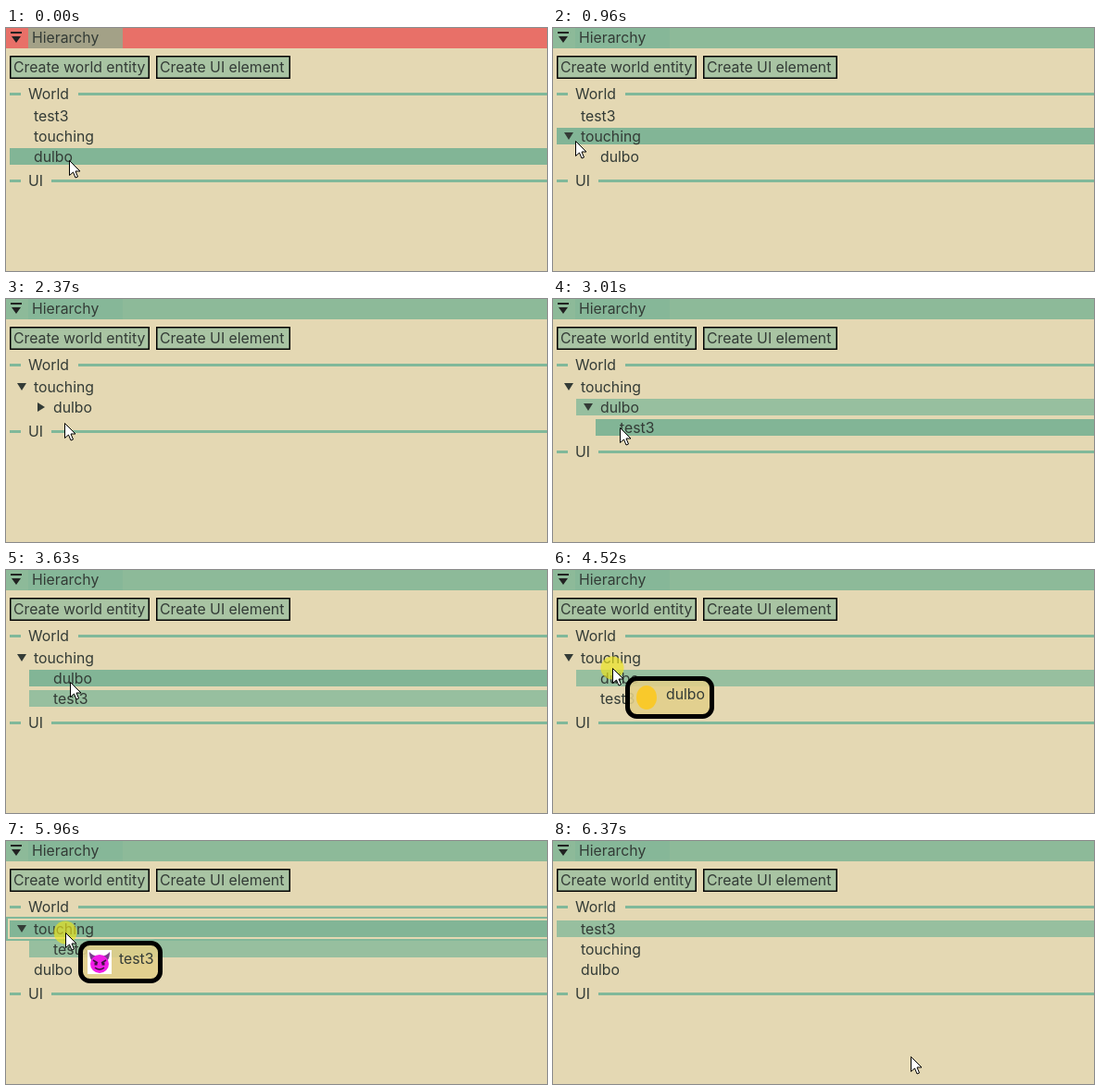
An HTML page that plays this animation: 584 by 263 pixels, repeating every 6440 ms.

```html
<!DOCTYPE html>
<html lang="en">
<head>
<meta charset="utf-8">
<title>Hierarchy panel</title>
<style>
html, body { margin: 0; width: 100%; height: 100%; overflow: hidden; background: #e4d8b3; }
svg { display: block; width: 584px; height: 263px; font: 15.8px Inter, "Open Sans", sans-serif; fill: #333b36; }
</style>
</head>
<body>
<svg id="stage" viewBox="0 0 584 263"></svg>
<script>
const LOOP = 6440, PITCH = 22, TOP = 86, INDENT = 21, DRAG_DISTANCE = 6;
const BG = '#e4d8b3', LINE = '#80b89a', HOVER = '#82b596', ACTIVE = '#8dba99', SELECTED = '#97bf9f';
const names = ['test3', 'touching', 'dulbo'];

// Mouse gestures: a drag drops an item onto another one, a click opens or closes it
const drag = (item, onto, down, arrive, up, from, to) => ({ item, onto, down, arrive, up, from, to });
const click = (item, down, up, at) => ({ item, down, arrive: up, up, from: at, to: at });
const gestures = [
  drag('dulbo', 'touching', 70, 400, 480, [68, 143], [62, 118]),
  click('touching', 770, 830, [20, 125]),
  drag('test3', 'dulbo', 1290, 1815, 2170, [65, 96], [75, 141]),
  click('dulbo', 2640, 2710, [38, 119]),
  drag('test3', 'dulbo', 3080, 3290, 3490, [73, 140], [69, 121]),
  drag('dulbo', 'touching', 4250, 4680, 4790, [65, 114], [63, 96]),
  drag('test3', 'touching', 5270, 6030, 6160, [62, 113], [64, 97])
];
const exit = { down: 6370, from: [386, 233] };

const icons = {
  test3: `<path fill="#fff" d="M0 0h26v26H0z"/>
    <path fill="#7b3a8c" d="M2 2Q2 9 5 12L11 7Q5 6 2 2M24 2Q24 9 21 12L15 7Q21 6 24 2"/>
    <circle cx="13" cy="15" r="10" fill="#f01ce6"/>
    <path fill="none" stroke="#401040" stroke-width="1.6" d="M6 11l5 3M20 11l-5 3M8 19q5 4 10 0"/>
    <path fill="#401040" d="M7.5 13.5h3v3h-3zM15.5 13.5h3v3h-3z"/>`,
  dulbo: '<ellipse cx="13" cy="13" rx="11" ry="13" fill="#f9c92b"/>'
};

const easeIn = k => k ** 1.7;
const easeInOut = k => k < .5 ? 4 * k ** 3 : 1 - 4 * (1 - k) ** 3;
const progress = (t, start, end) => Math.min(1, Math.max(0, (t - start) / (end - start)));
const mix = (a, b, k) => a.map((v, i) => Math.round(v + (b[i] - v) * k));

const rect = (x, y, w, h, fill, more = '') => `<rect x="${x}" y="${y}" width="${w}" height="${h}" fill="${fill}" ${more}/>`;
const text = (x, y, s) => `<text x="${x}" y="${y}">${s}</text>`;
const at = (x, y, content) => `<g transform="translate(${x} ${y})">${content}</g>`;
const button = (x, w, s) => rect(x + .75, 30.75, w - 1.5, 23.5, '#a9c4a3', 'stroke="#000" stroke-width="1.5"') + text(x + 4, 48, s);
const separator = (y, x, s) => rect(4, y - 1.5, 12, 3, LINE) + rect(x, y - 1.5, 584 - x, 3, LINE) + text(24, y + 5, s);

function pointer(t) {
  const i = gestures.findLastIndex(g => g.down <= t);
  if (i < 0) return gestures[0].from;
  const g = gestures[i], next = gestures[i + 1] || exit;
  return t < g.up
    ? mix(g.from, g.to, easeIn(progress(t, g.down, g.arrive)))
    : mix(g.to, next.from, easeInOut(progress(t, g.up, next.down)));
}

// Replays finished gestures; dropping an item onto its own parent lifts it one level
function treeAt(t) {
  const items = names.map((name, id) => ({ name, id, order: id, parent: null, open: false }));
  const find = name => items.find(item => item.name === name);
  gestures.filter(g => g.up <= t).forEach((g, n) => {
    const item = find(g.item), onto = find(g.onto);
    if (!onto) {
      item.open = !item.open;
      return;
    }
    item.parent = item.parent === onto ? onto.parent : onto;
    item.order = item.parent ? names.length + n : item.id;
  });
  return items.sort((a, b) => a.order - b.order);
}

function listRows(items, parent = null, depth = 0) {
  return items.filter(item => item.parent === parent).flatMap(item => {
    const children = listRows(items, item, depth + 1);
    const row = { name: item.name, depth, open: item.open, branch: children.length > 0 };
    return item.open ? [row, ...children] : [row];
  });
}

function header(focused) {
  return rect(0, 0, 584, 22, focused ? ACTIVE : '#e87068') +
    rect(24, 0, 102, 22, focused ? '#86b798' : '#a3a187') +
    '<path fill="#222" d="M5 4h12v2H5zM6 9h10l-5 7z"/>' + text(28, 16, 'Hierarchy');
}

function drawRow({ name, depth, open, branch }, i, mouse) {
  const dx = depth * INDENT, y = TOP + PITCH * i;
  const hovered = mouse.y >= y - 1 && mouse.y < y + 20;
  const held = mouse.held === name;
  const fill = hovered ? (held ? ACTIVE : HOVER) : mouse.selected === name && SELECTED;
  let out = fill ? rect(4 + dx, y, 580 - dx, 18, fill) : '';
  if (hovered && mouse.dragging && !held)
    out += rect(dx + 1, y - 3, 590, 24, 'none', `stroke="${LINE}" stroke-width="2"`);
  if (branch) out += at(17 + dx, y + 9, `<path d="${open ? 'M-5-4H5L0 4z' : 'M-4-5V5L4 0z'}"/>`);
  return out + text(30 + dx, y + 15, name);
}

// The tooltip trails slightly behind the pointer
function tooltip(t, name) {
  const [x, y] = pointer(t - 20);
  const width = name === 'test3' ? 86 : 91;
  return at(x + 14, y + 8,
    rect(2.5, 2.5, width, 41, '#e2d08a', 'fill-opacity=".88" rx="10" stroke="#000" stroke-width="5"') +
    at(10, 10, icons[name]) + text(44, 25, name));
}

function render(t) {
  const [x, y] = pointer(t);
  const g = gestures.findLast(g => g.down <= t);
  const pressed = g && t < g.up;
  const dragging = pressed && Math.hypot(x - g.from[0], y - g.from[1]) > DRAG_DISTANCE;
  const mouse = { y, dragging, held: pressed && g.item, selected: g && g.item };
  const rows = listRows(treeAt(t));
  return rect(0, 0, 584, 263, BG) + header(g) +
    button(4, 151, 'Create world entity') + button(162, 145, 'Create UI element') +
    separator(71.5, 78, 'World') +
    rows.map((row, i) => drawRow(row, i, mouse)).join('') +
    separator(99.5 + PITCH * rows.length, 49, 'UI') +
    (pressed ? `<circle cx="${x}" cy="${y}" r="12.5" fill="#ebe41c" opacity=".66"/>` : '') +
    (dragging ? tooltip(t, g.item) : '') +
    at(x + .5, y + .5, '<path fill="#fff" stroke="#000" d="M0 0V16L4 12.5 6.5 18.5 9 17.5 6.5 11.5H11.5Z"/>');
}

const stage = document.getElementById('stage');
const start = performance.now();
function frame() {
  stage.innerHTML = render((performance.now() - start) % LOOP);
  requestAnimationFrame(frame);
}
frame();
</script>
</body>
</html>
```
